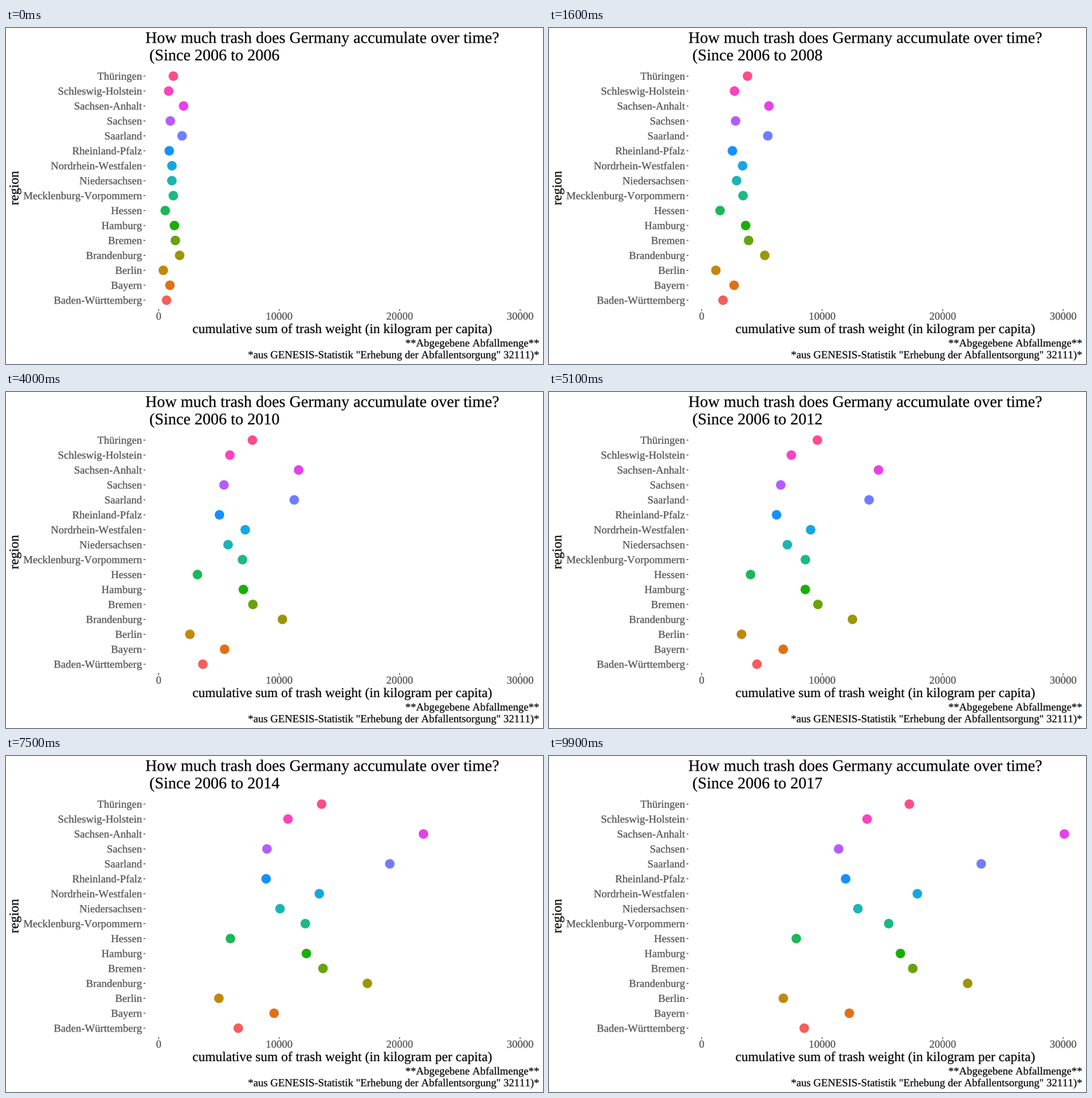
Recreate the animation shown at these times as a matplotlib script. Size 800x500 px, loop 10 s.

```python
import numpy as np
import matplotlib.pyplot as plt
from matplotlib.animation import FuncAnimation
from matplotlib.patches import Circle, PathPatch
from matplotlib.path import Path
from matplotlib.textpath import TextPath
from matplotlib.transforms import Affine2D

W, H, DPI = 800, 500, 100
PT = 72 / DPI                      # points per pixel
FRAMES, INTERVAL = 100, 100
FIRST_YEAR, LAST_YEAR = 2006, 2017
TOP, ROW, RADIUS = 71.6, 22.23, 7.1
LEFT, RIGHT, BOTTOM = 207.6, 794.4, 418.3
GREY, DARK = "#4d4d4d", "#333333"

plt.rcParams["font.family"] = "Liberation Serif"

# Each dot follows a cubic through four key positions
KEYS = np.array([0, 29, 65, 99]) / (FRAMES - 1)
REGIONS = {
    "Thüringen": ("#ff4c8c", 249.3, 334.2, 441.2, 536.8),
    "Schleswig-Holstein": ("#fc42c0", 242.3, 306.7, 395.8, 473.9),
    "Sachsen-Anhalt": ("#e442e8", 264.6, 384.3, 565.5, 767.7),
    "Sachsen": ("#b55cff", 244.8, 303.7, 370.8, 431.5),
    "Saarland": ("#717cff", 262.3, 381.5, 534.2, 643.9),
    "Rheinland-Pfalz": ("#1491ff", 243.2, 297.4, 366.7, 441.9),
    "Nordrhein-Westfalen": ("#14a7e0", 247.2, 324.4, 434.0, 548.7),
    "Niedersachsen": ("#1cb4b4", 247.1, 307.0, 386.1, 460.2),
    "Mecklenburg-Vorpommern": ("#1cb887", 249.3, 323.0, 419.5, 506.1),
    "Hessen": ("#1bb758", 237.2, 270.8, 320.0, 368.4),
    "Hamburg": ("#1bad0a", 250.9, 325.9, 419.2, 523.6),
    "Bremen": ("#68a20c", 252.3, 335.2, 442.5, 541.9),
    "Brandenburg": ("#9b950a", 258.7, 370.9, 502.6, 623.7),
    "Berlin": ("#c1880e", 234.3, 261.8, 304.3, 349.1),
    "Bayern": ("#e07014", 244.2, 302.5, 378.5, 447.4),
    "Baden-Württemberg": ("#f45e5c", 239.2, 277.2, 331.0, 380.2),
}

fig = plt.figure(figsize=(W / DPI, H / DPI), dpi=DPI, facecolor="white")
ax = fig.add_axes([0, 0, 1, 1])
ax.set_xlim(0, W)
ax.set_ylim(H, 0)
ax.axis("off")


def right_edge(text, size):
    return TextPath((0, 0), text, size=size).get_extents().x1


def text_path(text, size, align=0):
    """Outline of unkerned text; align is 0 left, 0.5 centre, 1 right."""
    glyphs, x = [], 0
    bar = right_edge("|", size)
    for ch in text:
        if ch != " ":
            glyphs.append(TextPath((x, 0), ch, size=size))
        x += right_edge(ch + "|", size) - bar
    path = Path.make_compound_path(*glyphs)
    return path.transformed(Affine2D().translate(-align * x, 0))


def label(x, y, path, color="black", angle=0):
    place = Affine2D().scale(1, -1).rotate_deg(-angle).translate(x, y)
    return ax.add_patch(PathPatch(path, fc=color, ec=color, lw=0.2 * PT,
                                  transform=place + ax.transData))


def tick(xs, ys):
    ax.plot(xs, ys, color=DARK, lw=1.07 * PT, solid_capstyle="butt", snap=False)


label(LEFT, 22.2, text_path("How much trash does Germany accumulate over time?", 24))
subtitles = [text_path(f" (Since {FIRST_YEAR} to {year}", 24)
             for year in range(FIRST_YEAR, LAST_YEAR + 1)]
subtitle = label(LEFT, 48.1, subtitles[0])

dots = []
for i, (name, (color, start, *_)) in enumerate(REGIONS.items()):
    y = TOP + i * ROW
    label(LEFT - 4.95, y + 5.3, text_path(name, 16, 1), GREY)
    tick([LEFT - 2.75, LEFT], [y, y])
    dots.append(ax.add_patch(Circle((start, y), RADIUS, fc=color, lw=0, zorder=3)))

for i in range(4):
    x = 227.5 + 179.5 * i
    tick([x, x], [BOTTOM, BOTTOM + 2.75])
    label(x, 434, text_path(str(10000 * i), 16, 0.5), GREY)

x_title = "cumulative sum of trash weight (in kilogram per capita)"
caption = ["**Abgegebene Abfallmenge**",
           '*aus GENESIS-Statistik "Erhebung der Abfallentsorgung" 32111)*']
label((LEFT + RIGHT) / 2, 454, text_path(x_title, 20, 0.5))
label(18.4, 238.2, text_path("region", 20, 0.5), angle=90)
for i, line in enumerate(caption):
    label(RIGHT, 474 + 17.4 * i, text_path(line, 16, 1))

positions = np.array([keys for _, *keys in REGIONS.values()]).T
curves = np.polyfit(KEYS, positions, 3)


def update(step):
    t = step / (FRAMES - 1)
    subtitle.set_path(subtitles[round(t * (LAST_YEAR - FIRST_YEAR))])
    for dot, x in zip(dots, t ** np.arange(3, -1, -1) @ curves):
        dot.set_center((x, dot.center[1]))
    return [subtitle, *dots]


anim = FuncAnimation(fig, update, frames=FRAMES, interval=INTERVAL,
                     repeat=True, repeat_delay=0, blit=False)
plt.show()
```
